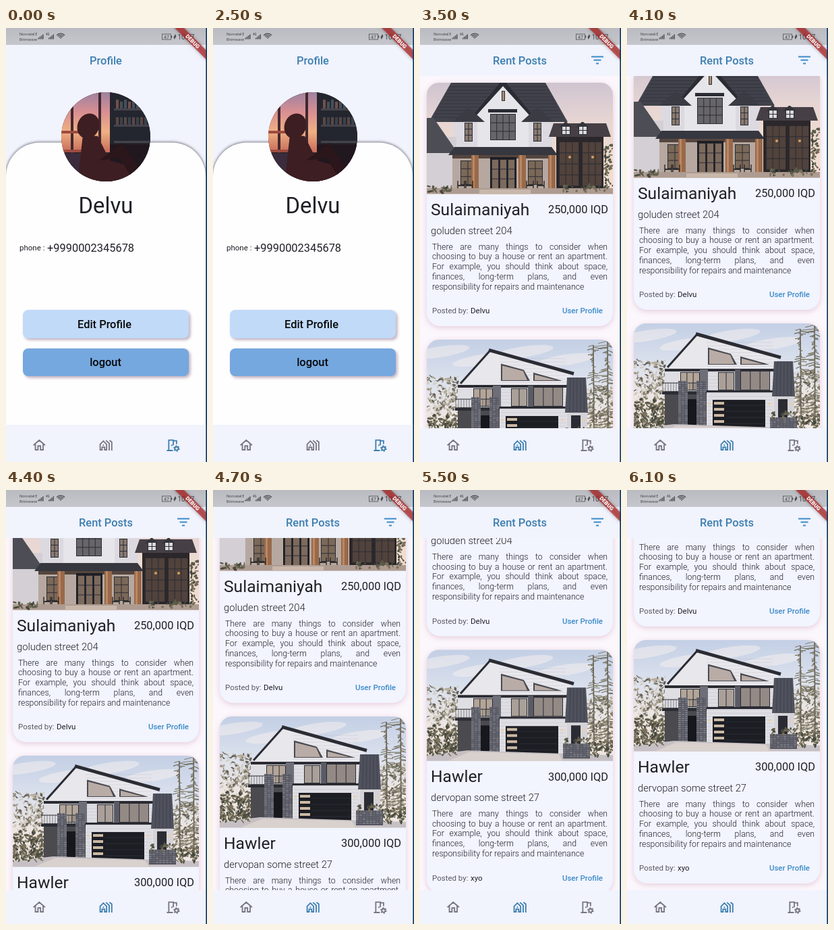
An HTML page with a canvas that plays this animation: 298x642 px, repeating every 6.2 s.

```html
<!DOCTYPE html>
<html lang="en">
<head>
<meta charset="utf-8">
<title>Rent Posts</title>
<style>
html, body { margin: 0; width: 100%; height: 100%; overflow: hidden; background: #f1f3fd; }
canvas { display: block; width: 298px; height: 642px; }
</style>
</head>
<body>
<canvas id="stage"></canvas>
<script>
const W = 298, H = 642, LOOP = 6200, STEP = 100, SWITCH = 2800;
const canvas = document.getElementById('stage');
const dpr = window.devicePixelRatio || 1;
canvas.width = W * dpr;
canvas.height = H * dpr;
const ctx = canvas.getContext('2d');

const BAR = '#f1f3fd', BLUE = '#3d7fb0', LINK = '#3b8bc9', GREY = '#77767f', INK = '#1f2026';
const DARK = '#2b2c33', STATUS = '#4a4b50';

// Each swipe eases over a few screen updates
const SWIPES = [
  { at: 4000, steps: 5, by: 68 },
  { at: 4600, steps: 4, by: 116 },
  { at: 5200, steps: 1, by: 20 },
  { at: 5400, steps: 3, by: 28 },
  { at: 5900, steps: 3, by: 7 }
];

const ABOUT = [
  'There are many things to consider when',
  'choosing to buy a house or rent an apartment.',
  'For example, you should think about space,',
  'finances, long-term plans, and even',
  'responsibility for repairs and maintenance'
];

const POSTS = [
  { city: 'Sulaimaniyah', price: '250,000 IQD', street: 'goluden street 204', by: 'Delvu', art: farmhouse },
  { city: 'Hawler', price: '300,000 IQD', street: 'dervopan some street 27', by: 'xyo', art: villa }
];

const ICONS = [
  'M3 12L12 4.2L21 12M6 10V19H10V13H14V19H18V10',
  'M3 19V10.5L8 5.4L13 10.5V19H10V15H6V19zM8 11V13M12 4.5L17 9V20M17.5 4.5L21 7V20',
  'M3 20H12.3M6 20V4H13V12M13 5H18V10M10.7 11V13'
].map(d => new Path2D(d));

function ease(p) {
  p = Math.min(1, Math.max(0, p));
  return p * p * (3 - 2 * p);
}

function scrollAt(t) {
  const tick = Math.floor(t / STEP);
  return SWIPES.reduce((y, s) => y + s.by * ease((tick + 1 - s.at / STEP) / s.steps), 0);
}

function rect(color, x, y, w, h) {
  ctx.fillStyle = color;
  ctx.fillRect(x, y, w, h);
}

function poly(color, ...pts) {
  ctx.fillStyle = color;
  ctx.beginPath();
  for (let i = 0; i < pts.length; i += 2) ctx.lineTo(pts[i], pts[i + 1]);
  ctx.fill();
}

// Symmetric roof or gable around x
function roof(color, x, y, top, base, h) {
  poly(color, x - top / 2, y, x + top / 2, y, x + base / 2, y + h, x - base / 2, y + h);
}

function oval(color, x, y, rx, ry = rx, turn = 0) {
  ctx.fillStyle = color;
  ctx.beginPath();
  ctx.ellipse(x, y, rx, ry, turn, 0, 7);
  ctx.fill();
}

function line(color, width, x0, y0, x1, y1) {
  ctx.strokeStyle = color;
  ctx.lineWidth = width;
  ctx.beginPath();
  ctx.moveTo(x0, y0);
  ctx.lineTo(x1, y1);
  ctx.stroke();
}

function fade(y0, y1, ...colors) {
  const g = ctx.createLinearGradient(0, y0, 0, y1);
  colors.forEach((c, i) => g.addColorStop(i / (colors.length - 1), c));
  return g;
}

function rounded(color, x, y, w, h, r) {
  ctx.fillStyle = color;
  ctx.beginPath();
  ctx.roundRect(x, y, w, h, r);
  ctx.fill();
}

function clipped(trace, draw) {
  ctx.save();
  ctx.beginPath();
  trace();
  ctx.clip();
  draw();
  ctx.restore();
}

function withShadow(color, blur, dx, dy, draw) {
  ctx.save();
  ctx.shadowColor = color;
  ctx.shadowBlur = blur * dpr;
  ctx.shadowOffsetX = dx * dpr;
  ctx.shadowOffsetY = dy * dpr;
  draw();
  ctx.restore();
}

function text(str, x, y, size, color, weight = 400, align = 'left') {
  ctx.font = `${weight} ${size}px Roboto, sans-serif`;
  ctx.fillStyle = color;
  ctx.textAlign = align;
  ctx.fillText(str, x, y);
}

function justified(str, x, y, width, size, color, weight) {
  ctx.font = `${weight} ${size}px Roboto, sans-serif`;
  const words = str.split(' ');
  const widths = words.map(w => ctx.measureText(w).width);
  const gap = (width - widths.reduce((a, b) => a + b)) / (words.length - 1);
  words.forEach((w, i) => {
    text(w, x, y, size, color, weight);
    x += widths[i] + gap;
  });
}

function random(seed) {
  return () => (seed = (seed * 16807) % 2147483647) / 2147483647;
}

const FROST = ['#b3aa99', '#857f6f', '#d2cbc0', '#625f54'];
const SHRUB = ['#5c5b49', '#7a705a', '#45483d'];

function leaves(seed, x, y, w, h, size, colors) {
  const rnd = random(seed * 7919);
  for (let n = w * h / (size * size * 2); n > 0; n--) {
    const color = colors[Math.floor(rnd() * colors.length)];
    oval(color, x + rnd() * w, y + rnd() * h, size * (0.4 + rnd()), size * (0.2 + rnd() * 0.5), rnd() * 3);
  }
}

function pine(seed, x, y, h, spread) {
  const rnd = random(seed * 7919);
  line('#5f574c', 1.5, x, y, x + 1, y + h);
  for (let i = 0; i < h; i += 1.5) {
    const reach = (rnd() * 2 - 1) * spread * (0.6 + 0.4 * Math.cos(i / 9));
    line(i % 2 ? '#6f6b58' : '#8b8370', 1.2, x, y + i, x + reach, y + i + 4 * rnd());
  }
}

function stones(x, y, w, h) {
  const rnd = random(x * 991);
  rect('#54555e', x, y, w, h);
  for (let j = 0; j < h - 1; j += 3)
    for (let i = 0; i < w - 2; i += 5)
      rect(rnd() < 0.5 ? '#777883' : '#656670', x + i, y + j, Math.min(4, w - i), 2);
}

function pane(x, y, w, h, cols, rows, glass = '#6d6867') {
  rect(DARK, x, y, w, h);
  const cw = (w - 1) / cols, ch = (h - 1) / rows;
  for (let i = 0; i < cols; i++)
    for (let j = 0; j < rows; j++)
      rect(glass, x + 1 + i * cw, y + 1 + j * ch, cw - 1, ch - 1);
}

// Both houses fill a 276 x 165 box
function farmhouse() {
  rect(fade(0, 110, '#cfc4d0', '#e6d5d3', '#f0ddcf'), 0, 0, 276, 165);

  roof('#41424b', 106, 0, 140, 206, 58);
  for (let y = 6; y < 56; y += 5) line('rgba(25,26,33,.35)', 1, 36 - y / 2, y, 176 + y / 2, y);
  rect('#dcdae0', 40, 56, 146, 50);
  roof(DARK, 113, -3, 4, 90, 52);
  roof('#e6e5ea', 113, 5, 0, 80, 44);
  rect('#e6e5ea', 75, 48, 76, 56);
  pane(111, 12, 5, 15, 1, 1, '#a98a70');
  rect(DARK, 91, 39, 43, 5);
  pane(94, 46, 38, 39, 4, 3, '#67656a');
  for (const x of [62, 164]) {
    roof('#3a3b43', x, 38, 4, 48, 20);
    pane(x - 6, 59, 12, 28, 2, 3, '#897a70');
  }

  rect('#d3cfd4', 0, 80, 44, 80);
  roof('#4c4d55', 2, 52, 16, 88, 52);

  rect('#b6a8a0', 38, 107, 152, 51);
  rect('#54453e', 38, 107, 152, 5);
  roof('#36373f', 113, 95, 144, 162, 12);
  for (const x of [50, 150]) pane(x, 115, 22, 36, 2, 3, '#7b6858');
  rect('#1d1e23', 94, 110, 39, 50);
  for (let i = 0; i < 3; i++) pane(96 + i * 12, 113, 11, 44, 1, 3, '#7c6a5d');
  for (const x of [66, 136, 180]) {
    rect('#99694b', x, 107, 11, 53);
    rect('#b98863', x + 2, 107, 3, 53);
  }
  for (const x of [46, 58, 148, 164])
    for (const side of [0, 10]) {
      line('#2c2826', 1.4, x + side, 145, x + side, 160);
      line('#2c2826', 1.4, x, 152, x + 10, 152);
    }

  rect('#2b272a', 192, 78, 70, 80);
  roof('#463f46', 227, 60, 78, 92, 20);
  for (const x of [206, 231]) {
    roof('#34353d', x, 58, 2, 20, 8);
    pane(x - 6, 64, 13, 13, 2, 2, '#dcd9da');
  }
  for (const x of [196, 230]) {
    pane(x, 87, 30, 66, 3, 4, '#51423c');
    oval('#d9a15f', x + 16, 110, 2);
  }
  leaves(4, 264, 92, 12, 64, 3, SHRUB);

  rect('#ad9b91', 0, 156, 276, 9);
  rect('#c8b7aa', 78, 158, 76, 7);
  leaves(5, 0, 152, 40, 10, 3, SHRUB);
  leaves(6, 198, 152, 74, 9, 3, SHRUB);
}

function villa() {
  const ridge = x => 16 + (x - 94) * 0.277;
  rect(fade(0, 120, '#c3cfe5', '#dbe1ed', '#efe6e0'), 0, 0, 276, 165);
  for (let i = 0; i < 4; i++) oval('rgba(244,238,238,.55)', 20 + i * 62, 18 + (i % 2) * 12, 44, 8, -0.15);
  leaves(1, 0, 54, 46, 96, 2.6, FROST);
  leaves(2, 238, 70, 38, 80, 2.6, FROST);
  pine(3, 268, 2, 145, 22);
  pine(4, 247, 8, 130, 15);
  leaves(5, 0, 112, 48, 40, 3, SHRUB);

  rect('#dfdee3', 46, 66, 166, 88);
  poly('#e8e7ec', 94, 16, 214, ridge(214), 212, 68, 50, 68);
  for (let y = 28; y < 150; y += 5) line('rgba(150,150,165,.3)', 0.7, 108, y, 206, y);
  line(DARK, 5, 92, ridge(92), 218, ridge(218));
  line(DARK, 3, 94, 16, 50, 65);
  for (const x of [110, 158]) {
    poly('#4a4a50', x, ridge(x) + 15, x + 34, ridge(x + 34) + 15, x + 43, 61, x, 61);
    poly('#b9aca6', x + 2, ridge(x) + 18, x + 33, ridge(x + 33) + 17, x + 39, 60, x + 2, 60);
  }

  rect(DARK, 46, 67, 164, 4);
  rect('#6d6e78', 98, 68, 12, 32);
  pane(69, 72, 29, 27, 3, 1, '#b3a598');
  pane(125, 72, 24, 27, 2, 1, '#aaa099');
  rect('#5a5b64', 150, 68, 8, 32);
  pane(158, 70, 44, 29, 3, 1, '#938a86');
  rect(DARK, 108, 99, 98, 3);

  roof('#4f525d', 222, 56, 28, 34, 52);
  for (let i = 1; i < 6; i++) line('#3b3e48', 0.8, 208 + i * 5, 57, 206 + i * 5.5, 107);
  rect('#d5d3d7', 208, 108, 30, 42);
  rect(DARK, 214, 112, 14, 30);

  rect('#4b4a4e', 46, 100, 62, 52);
  rect('#17181d', 66, 112, 28, 38);
  rect(DARK, 42, 101, 66, 4);
  for (let x = 43; x < 106; x += 4) line('rgba(50,52,60,.7)', 0.8, x, 88, x, 101);
  line(DARK, 1, 42, 88, 106, 88);
  for (const x of [66, 93]) stones(x, 85, 14, 70);

  rect('#1c1e24', 117, 113, 78, 41);
  for (let y = 116; y < 152; y += 9) {
    line('#2f323a', 0.8, 136, y + 5, 194, y + 5);
    rect('#cbb9a4', 119, y, 15, 4);
  }
  for (const x of [112, 201, 232]) oval('#f2cf96', x, 119, 1.6);

  poly('#c6c0c4', 0, 156, 60, 149, 276, 156, 276, 165, 0, 165);
  poly('#d9d1cd', 64, 151, 196, 155, 202, 165, 30, 165);
  stones(202, 139, 40, 22);
  leaves(6, 203, 131, 38, 9, 2.6, SHRUB);
  leaves(7, 241, 134, 35, 24, 2.6, SHRUB);
  leaves(8, 0, 146, 44, 10, 2.6, SHRUB);
}

function avatar() {
  rect('#221b22', 80, 94, 136, 136);
  rect(fade(96, 182, '#a0829f', '#d98f92', '#f0b183', '#c96f5c'), 82, 94, 72, 90);
  for (const x of [96, 137]) rect('#42282f', x, 94, 4, 92);
  for (const y of [152, 180]) rect('#9c4b40', 82, y, 40, 4);

  rect('#24262f', 154, 94, 62, 92);
  for (let y = 119; y < 170; y += 24) rect('#46434b', 160, y, 54, 3);
  for (let i = 0; i < 8; i++) {
    rect(i % 3 ? '#46505a' : '#70504b', 163 + i * 6, 106 + (i % 2) * 3, 4, 13 - (i % 2) * 3);
    rect(i % 2 ? '#3a424c' : '#5b4743', 163 + i * 6, 132, 4, 11);
  }
  rect('#3a2c3c', 80, 185, 136, 45);
  rect('#20171f', 154, 172, 62, 58);

  // Seated figure: torso, hood, raised knee
  poly('#3d1e22', 114, 158, 136, 160, 154, 196, 190, 206, 186, 230, 106, 230);
  oval('#3d1e22', 122, 145, 16, 19, 0.4);
  poly('#2a161b', 138, 196, 172, 170, 204, 218, 188, 224, 168, 192);
}

function icon(i, x, y, size, color) {
  ctx.save();
  ctx.translate(x, y);
  ctx.scale(size / 24, size / 24);
  ctx.translate(-12, -12);
  ctx.strokeStyle = color;
  ctx.lineWidth = 1.9;
  ctx.stroke(ICONS[i]);
  if (i === 2) gear(18, 17);
  ctx.restore();
}

function gear(x, y) {
  const teeth = 6, pitch = Math.PI * 8 / teeth;
  for (const [r, dash] of [[2.7, []], [4, [2, pitch - 2]]]) {
    ctx.setLineDash(dash);
    ctx.beginPath();
    ctx.arc(x, y, r, 0, Math.PI * 2);
    ctx.stroke();
  }
}

function signal(label, x) {
  text(label, x, 11, 4.5, STATUS, 500);
  for (let i = 0; i < 4; i++) rect(STATUS, x + 4 + i * 2.2, 14.5 - i * 1.7, 1.4, 2 + i * 1.7);
}

function statusBar() {
  rect(fade(0, 25, '#babbc1', '#c6c7cd'), 0, 0, W, 25);
  text('Norvatel', 20, 10.5, 6, STATUS);
  text('Brimwave', 20, 19, 6, STATUS);
  signal('E', 43.5);
  signal('4G', 59);
  ctx.strokeStyle = STATUS;
  ctx.lineWidth = 1.2;
  for (let r = 1; r < 9; r += 2.3) {
    ctx.beginPath();
    ctx.arc(81, 16, r, -Math.PI * 0.77, -Math.PI * 0.23);
    ctx.stroke();
  }
  ctx.lineWidth = 0.8;
  ctx.strokeRect(231.5, 9, 13, 8);
  rect(STATUS, 245, 11.5, 1.2, 3);
  text('47', 238, 15.8, 7, STATUS, 400, 'center');
  poly(STATUS, 251, 9, 248.6, 13.4, 249.6, 17, 252.4, 12.2);
  text('10:07', 254.5, 16.5, 10, STATUS);
}

function debugBanner() {
  ctx.save();
  ctx.translate(296.5, 0);
  ctx.rotate(Math.PI / 4);
  withShadow('rgba(0,0,0,.5)', 5, 0, 0, () => rect('rgba(183,28,28,.66)', -34, 23, 68, 9.8));
  text('DEBUG', 0, 30.7, 8, '#fff', 800, 'center');
  ctx.restore();
}

function button(label, x, y, h, color) {
  withShadow('rgba(130,95,120,.5)', 4, 2.5, 2.5, () => rounded(color, 25, y, 246, h, 8));
  text(label, x, y + h / 2 + 5.8, 16.4, '#08090c', 500, 'center');
}

function title(str) {
  rect(BAR, 0, 25, W, 46);
  text(str, 148, 54, 16.4, BLUE, 500, 'center');
}

function profilePage() {
  rect(BAR, 0, 25, W, H);
  title('Profile');
  withShadow('rgba(40,36,46,.75)', 4, 0, -0.5, () => rounded('#fefeff', 0, 169.5, 296, 450, [50, 50, 0, 0]));
  clipped(() => ctx.arc(148, 161, 66, 0, 7), avatar);
  text('Delvu', 148, 274, 32.8, INK, 400, 'center');
  text('phone :', 20, 329, 11.5, INK);
  text('+9990002345678', 61, 331, 16.4, INK);
  button('Edit Profile', 146, 417, 42, '#c1daf8');
  button('logout', 147.5, 474, 41, '#75a8de');
}

function card(post, top) {
  ctx.save();
  ctx.translate(0, top);
  withShadow('rgba(205,165,190,.55)', 9, 0, 2, () => rounded('#f2f4fe', 10, 0, 276, 360, 20));
  clipped(() => ctx.roundRect(10, 0, 276, 164.5, [18, 18, 0, 0]), () => {
    ctx.translate(10, 0);
    post.art();
  });
  text(post.city, 16, 196, 24.6, INK);
  text(post.price, 279, 193.3, 16.4, INK, 400, 'right');
  text(post.street, 16, 223.5, 14.76, INK, 300);
  ABOUT.forEach((str, i) => {
    const y = 246.5 + i * 14.75;
    if (i < ABOUT.length - 1) justified(str, 18, y, 260, 12.3, INK, 300);
    else text(str, 18, y, 12.3, INK, 300);
  });
  text('Posted by:', 18, 341.3, 11.5, '#5a5b63');
  text(post.by, 75, 341.3, 11.5, INK);
  text('User Profile', 271, 341.3, 11.5, LINK, 500, 'right');
  ctx.restore();
}

function postsPage(scroll) {
  rect('#fcf7fc', 0, 25, W, H);
  clipped(() => ctx.rect(0, 71, W, 521), () =>
    POSTS.forEach((post, i) => card(post, 81 + i * 380 - scroll)));
  title('Rent Posts');
  for (let i = 0; i < 3; i++) rect(LINK, 254 + i * 3.5, 41.5 + i * 5, 18 - i * 7, 2);
}

function navBar(top, active, ripple) {
  clipped(() => ctx.rect(0, top, W, H - top), () => {
    rect(BAR, 0, top, W, H - top);
    oval('rgba(60,60,80,.05)', 148, 617, ripple);
  });
  ICONS.forEach((_, i) => icon(i, 49.3 + i * 98.9, 617.3, 23, i === active ? BLUE : GREY));
}

function render(t) {
  ctx.setTransform(dpr, 0, 0, dpr, 0, 0);
  if (t < SWITCH) {
    profilePage();
    navBar(587, 2, 0);
  } else {
    const beat = Math.floor((t - SWITCH) / STEP);
    postsPage(scrollAt(t));
    navBar(592, 1, beat < 2 ? 18 + beat * 9 : 0);
  }
  statusBar();
  debugBanner();
  rect('#123a63', 296.3, 0, 1.7, H);
}

const start = performance.now();
function tick() {
  render((performance.now() - start) % LOOP);
  requestAnimationFrame(tick);
}
tick();
</script>
</body>
</html>
```
